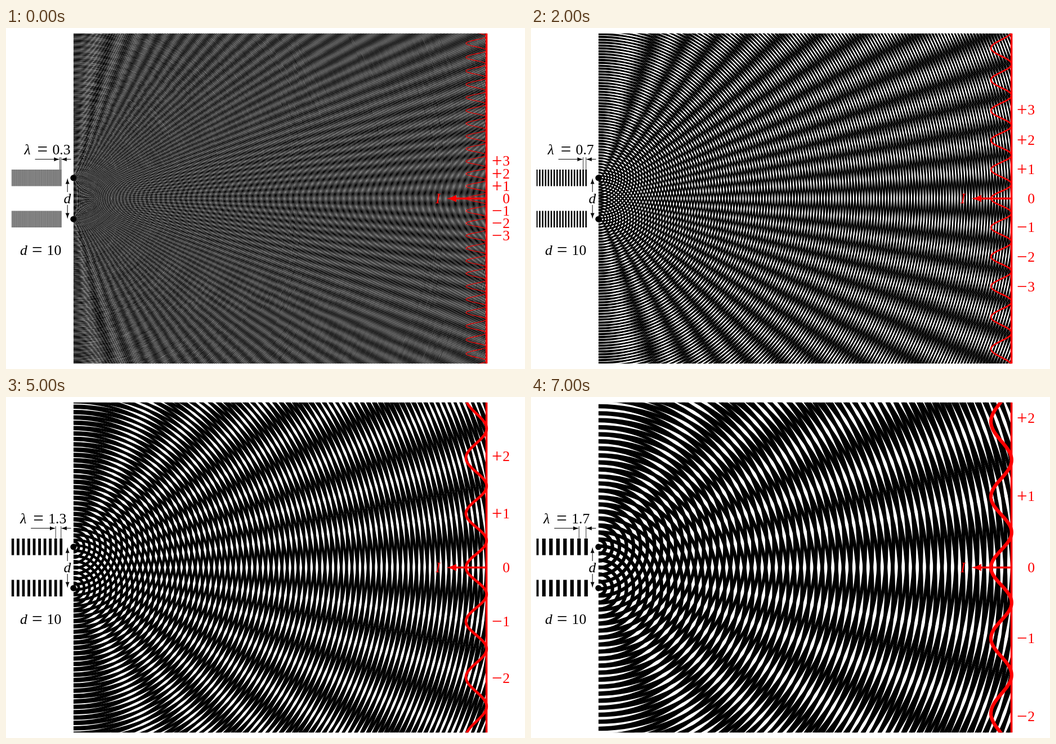
Animation, 922 px wide and 607 px high, one loop 8000 ms. Source, as an HTML page:

```html
<!DOCTYPE html>
<html lang="en">
<head>
<meta charset="utf-8">
<title>Double-slit interference</title>
<style>
  html, body { margin: 0; width: 100%; height: 100%; overflow: hidden; background: #fff; }
  svg { display: block; }
  text { font: 25.7px "Liberation Serif", Times, serif; }
  .it { font-style: italic; }
  .op { font-size: 33px; }
  .red { fill: #f00; }
  .line { fill: none; stroke: #000; }
  .thin { stroke-width: 1; }
  .redline { fill: none; stroke: #f00; }
</style>
</head>
<body>
<svg width="922" height="607" viewBox="0 0 922 607">
  <defs>
    <clipPath id="field"><rect x="119.8" y="9.8" width="734" height="587.4"/></clipPath>
    <clipPath id="strip"><rect x="9.7" y="9.8" width="110" height="587.4"/></clipPath>
    <clipPath id="screen"><rect x="800" y="9.8" width="60" height="587.4"/></clipPath>
  </defs>
  <g clip-path="url(#field)">
    <path id="upper" class="line"/>
    <path id="lower" class="line"/>
  </g>
  <g clip-path="url(#strip)"><path id="bars" class="line"/></g>

  <circle cx="119.8" cy="266.8" r="5.5"/>
  <circle cx="119.8" cy="340.2" r="5.5"/>

  <path class="line thin" d="M109.2 276V292M109.2 315V331"/>
  <path d="M109.2 267.3q1 6 3.5 10.2h-7q2.5-4.2 3.5-10.2zM109.2 339.7q1-6 3.5-10.2h-7q2.5 4.2 3.5 10.2z"/>
  <text class="it" x="102.5" y="312.3">d</text>

  <text class="it" x="25" y="404">d</text>
  <text class="op" x="46" y="406">=</text>
  <text x="72.6" y="404">10</text>

  <path id="ticks" class="line" stroke-width=".8"/>
  <path class="line thin" d="M105 233.7H115.5"/>
  <path d="M97.6 233.7q6-1 10.2-3.5v7q-4.2-2.5-10.2-3.5z"/>
  <g id="measure">
    <path class="line thin" d="M-44 233.7H-8"/>
    <path d="M0 233.7q-6-1-10.2-3.5v7q4.2-2.5 10.2-3.5z"/>
    <text class="it" x="-63" y="225">λ</text>
    <text class="op" x="-40" y="227">=</text>
    <text id="value" x="-13.1" y="225"></text>
  </g>

  <g clip-path="url(#screen)"><path id="intensity" class="redline" stroke-linejoin="round"/></g>
  <path class="redline" stroke-width="3.6" d="M853.6 9.8V597.2M798 303.5H853.6"/>
  <path class="red" d="M782.5 303.5q10-2 17.5-6.3v12.6q-7.5-4.3-17.5-6.3z"/>
  <text class="it red" x="763" y="312">I</text>
  <g id="orders"></g>
</svg>
<script>
const U = 7.34, X0 = 119.8, MID = 303.5, X1 = X0 + 100 * U;
const D = 10, HALF = 40, BAR = X0 - 3 * U;
const STEP = 1000, COUNT = 8;
const el = id => document.getElementById(id);
const set = (id, attrs) => {
  for (const k in attrs) el(id).setAttribute(k, attrs[k]);
};
const px = v => v.toFixed(3);

// Half circles of radius n * lambda around one slit.
// Two quarter arcs each, so that rounding cannot shift the centre.
function waves(y, lambda) {
  let d = "";
  for (let r = lambda; r < 112; r += lambda) {
    const R = px(r * U), arc = `A${R} ${R} 0 0 1 `;
    d += `M${X0} ${px(y - r * U)}${arc}${px(X0 + r * U)} ${px(y)}${arc}${X0} ${px(y + r * U)}`;
  }
  return d;
}

function plane(lambda) {
  let d = "";
  const last = Math.floor(12 / lambda + 1e-9);
  for (let n = 0; n <= last; n++) {
    const x = px(BAR - n * lambda * U);
    d += `M${x} 252.1V281.5M${x} 325.5V354.9`;
  }
  return d;
}

function profile(lambda) {
  let d = "";
  for (let y = -HALF - 1; y <= HALF + 1; y += 0.1) {
    const phase = Math.PI * D * Math.atan(y / 100) / lambda;
    const x = X1 - 5 * U * Math.cos(phase) ** 2;
    d += (d ? "L" : "M") + px(x) + " " + px(MID + y * U);
  }
  return d;
}

function orders(lambda) {
  let out = "";
  for (let m = -3; m <= 3; m++) {
    const y = 100 * Math.tan(Math.asin(m * lambda / D));
    if (Math.abs(y) > HALF) continue;
    const base = MID - y * U + 8.3;
    if (m) out += `<text class="op red" x="863" y="${px(base + 2)}">${m > 0 ? "+" : "−"}</text>`;
    out += `<text class="red" x="882.3" y="${px(base)}">${Math.abs(m)}</text>`;
  }
  return out;
}

function draw(step) {
  const lambda = (3 + 2 * step) / 10;
  const width = px(lambda * U / 2);
  const left = px(BAR - lambda * U);
  set("upper", { d: waves(MID - D / 2 * U, lambda), "stroke-width": width });
  set("lower", { d: waves(MID + D / 2 * U, lambda), "stroke-width": width });
  set("bars", { d: plane(lambda), "stroke-width": width });
  set("intensity", { d: profile(lambda), "stroke-width": width });
  set("ticks", { d: `M${left} 230V252.1M${px(BAR)} 230V252.1` });
  set("measure", { transform: `translate(${left} 0)` });
  el("value").textContent = lambda.toFixed(1);
  el("orders").innerHTML = orders(lambda);
}

let shown = -1;
const start = performance.now();
function tick() {
  const step = Math.floor((performance.now() - start) / STEP) % COUNT;
  if (step !== shown) draw(shown = step);
  requestAnimationFrame(tick);
}
tick();
</script>
</body>
</html>
```
